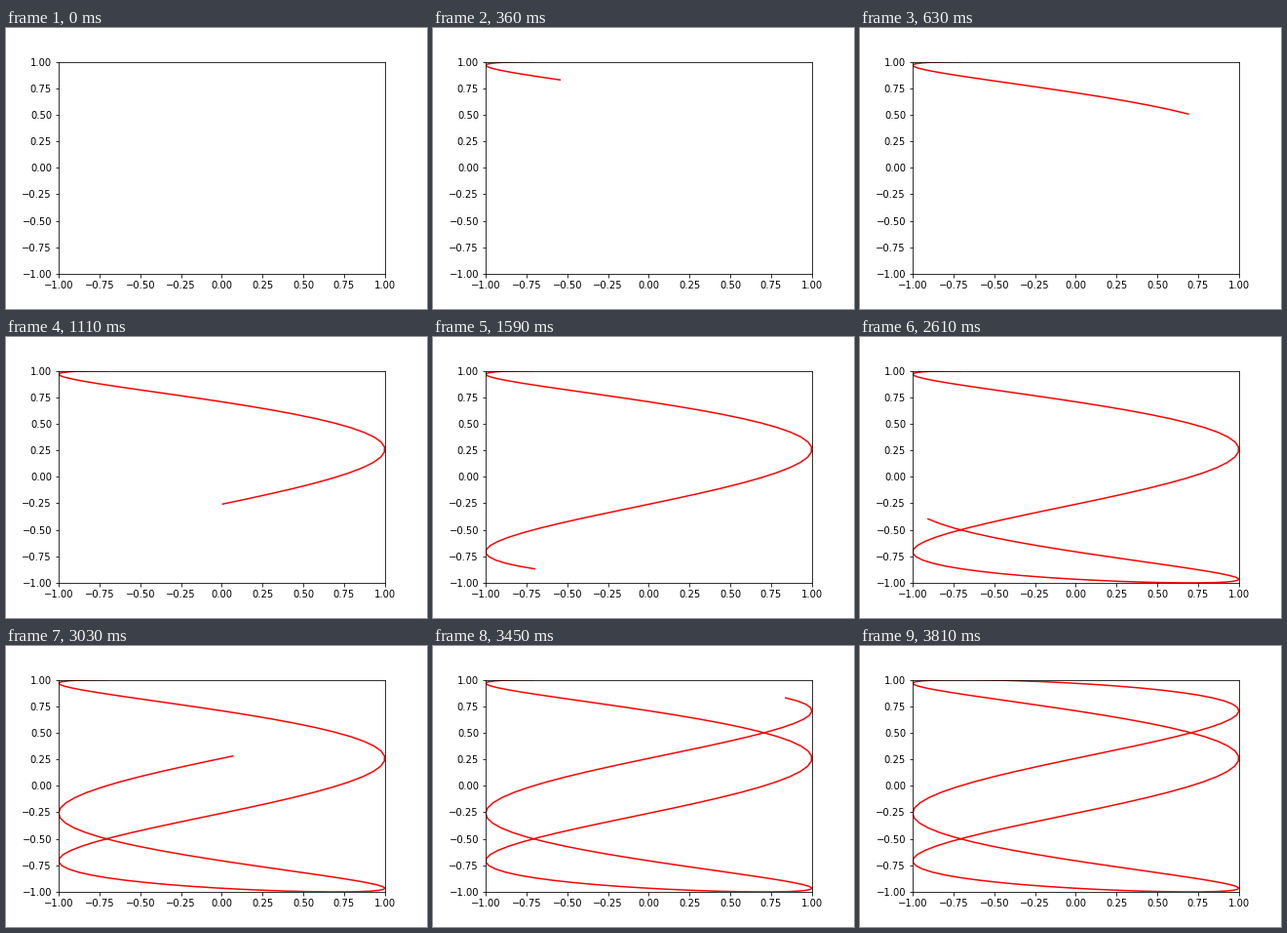
A matplotlib script that plays this animation: 432x288 px, repeating every 3.84 s.

```python
import numpy as np
import matplotlib.pyplot as plt
from matplotlib.animation import FuncAnimation

FRAMES = 128
INTERVAL = 30  # ms

t = np.linspace(0, 2 * np.pi, FRAMES)
x = np.sin(3 * t + 5 * np.pi / 4)
y = np.cos(t)

fig, ax = plt.subplots(figsize=(6, 4), dpi=72)
fig.subplots_adjust(left=0.125, right=0.9, bottom=0.125, top=0.88)
ax.set_xlim(-1, 1)
ax.set_ylim(-1, 1)
ticks = np.linspace(-1, 1, 9)
ax.set_xticks(ticks)
ax.set_yticks(ticks)
line, = ax.plot([], [], color="red", lw=1.5)


def init():
    line.set_data([], [])
    return line,


def update(i):
    line.set_data(x[:i + 1], y[:i + 1])
    return line,


anim = FuncAnimation(fig, update, frames=FRAMES, init_func=init,
                     interval=INTERVAL, repeat=True, repeat_delay=0)
plt.show()
```
